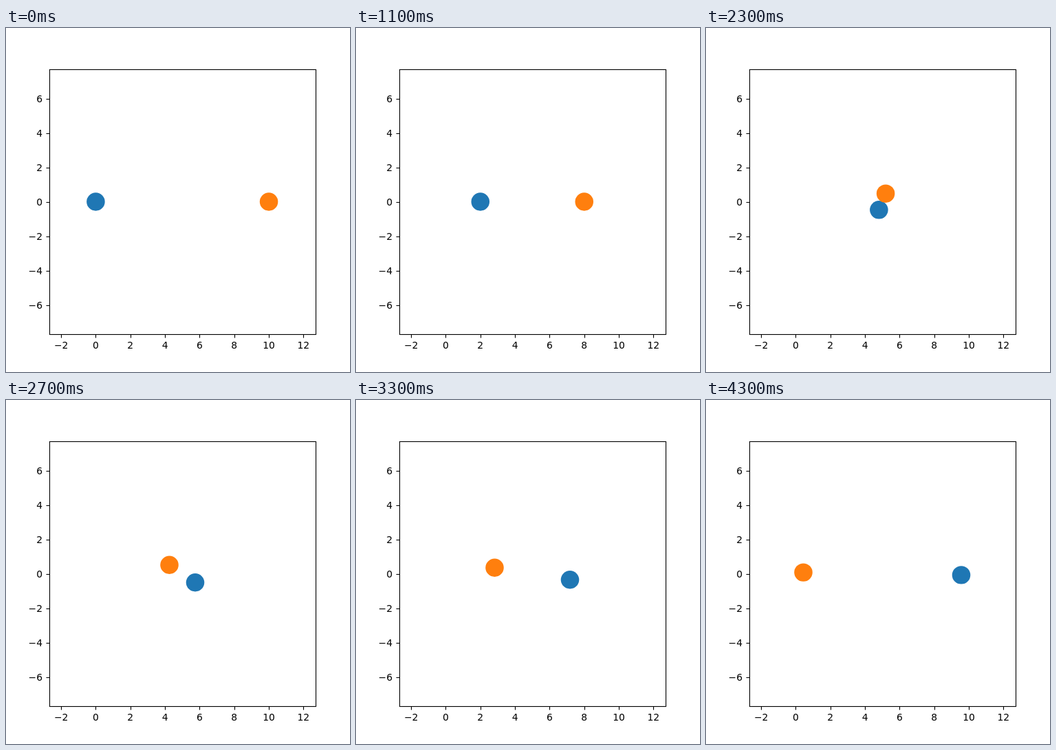
An HTML page that plays this animation: 500x500 px, repeating every 4.5 s.

```html
<!DOCTYPE html>
<html lang="en">
<head>
<meta charset="utf-8">
<title>Two discs passing</title>
<style>
  html, body { margin: 0; width: 100%; height: 100%; overflow: hidden; background: #fff; }
  svg { display: block; width: 100%; height: 100%; }
  text { font: 13.89px "DejaVu Sans", sans-serif; fill: #000; }
  .line { fill: none; stroke: #000; stroke-width: 1.11; }
</style>
</head>
<body>
<svg id="plot" viewBox="0 0 500 500">
  <rect class="line" x="63.5" y="60.5" width="387" height="385"/>
</svg>
<script>
const LOOP = 4500, FIRST = 500, STEP = 200;
const MID = { x: 256.25, y: 252.5 };
const SCALE = { x: 387.5 / 15.4, y: 25 };

// Step number, then the blue disc's pixel offset from the centre.
const PATH = [
  [0, -5 * SCALE.x, 0],
  [5, -2.5 * SCALE.x, 0],
  [11, 6.75, 14.16],
  [20, 114.75, 1.9]
];

const plot = document.getElementById('plot');

function add(tag, attrs, text = '') {
  const el = document.createElementNS('http://www.w3.org/2000/svg', tag);
  for (const key in attrs) el.setAttribute(key, attrs[key]);
  el.textContent = text;
  plot.append(el);
  return el;
}

const label = v => String(v).replace('-', '\u2212');
const snap = v => Math.floor(v + 0.5) + 0.5;

for (let v = -2; v <= 12; v += 2) {
  const x = MID.x + (v - 5) * SCALE.x;
  add('path', { class: 'line', d: `M${snap(x)} 445.5v5` });
  add('text', { x, y: 466, 'text-anchor': 'middle' }, label(v));
}
for (let v = -6; v <= 6; v += 2) {
  const y = MID.y - v * SCALE.y;
  add('path', { class: 'line', d: `M63.5 ${snap(y)}h-5` });
  add('text', { x: 53, y: y + 5.5, 'text-anchor': 'end' }, label(v));
}

const disc = fill => add('ellipse', { rx: 13.27, ry: 13.19, fill });
const blue = disc('#1f77b4');
const orange = disc('#ff7f0e');

function place(el, dx, dy) {
  el.setAttribute('cx', MID.x + dx);
  el.setAttribute('cy', MID.y + dy);
}

function offsetAt(step) {
  const i = PATH.findIndex(p => p[0] > step);
  const end = i < 0 ? PATH.length - 1 : i;
  const [s0, x0, y0] = PATH[end - 1];
  const [s1, x1, y1] = PATH[end];
  const k = (step - s0) / (s1 - s0);
  return [x0 + (x1 - x0) * k, y0 + (y1 - y0) * k];
}

function draw(time) {
  const t = time % LOOP;
  const step = t < FIRST ? 0 : 1 + Math.floor((t - FIRST) / STEP);
  const [dx, dy] = offsetAt(step);
  place(blue, dx, dy);
  place(orange, -dx, -dy);
}

const start = performance.now();
function tick() {
  draw(performance.now() - start);
  requestAnimationFrame(tick);
}
tick();
</script>
</body>
</html>
```
